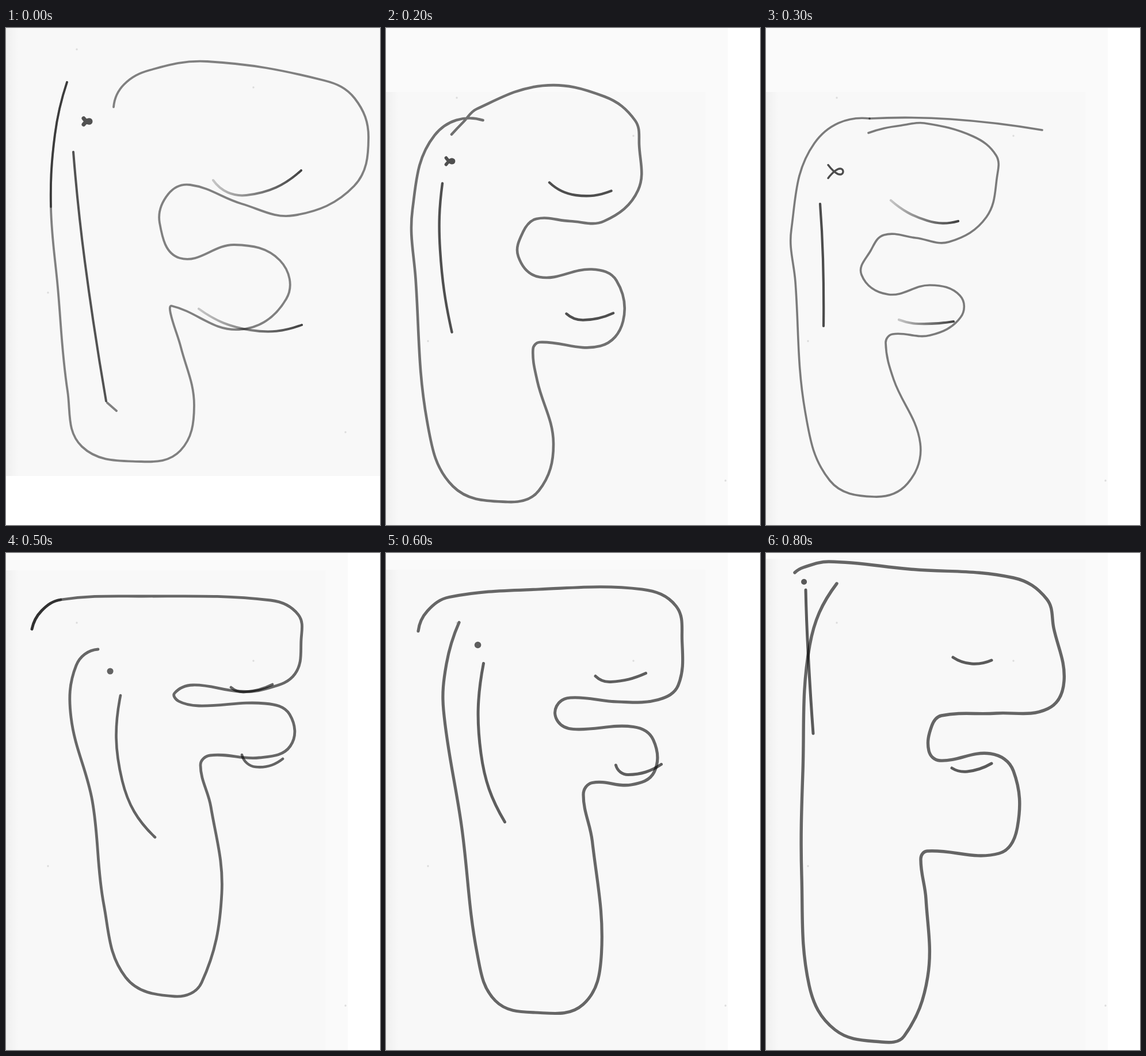
Recreate the animation shown at these times as an HTML page. Size 650 px wide and 862 px high, loop 900 ms.

```html
<!DOCTYPE html>
<html lang="en">
<head>
<meta charset="utf-8">
<title>Hand-drawn F</title>
<style>
html, body { margin: 0; width: 100%; height: 100%; overflow: hidden; background: #fff; }
svg { display: block; width: 100%; height: 100%; }
#ink { fill: none; stroke-linecap: round; stroke-linejoin: round; }
#ink * { mix-blend-mode: multiply; }
</style>
</head>
<body>
<svg viewBox="0 0 650 862">
  <defs>
    <linearGradient id="edge">
      <stop offset="0" stop-opacity=".035"/>
      <stop offset="1" stop-opacity="0"/>
    </linearGradient>
    <linearGradient id="fade">
      <stop offset="0" stop-color="#ccc"/>
      <stop offset=".5" stop-color="#808080"/>
      <stop offset="1" stop-color="#444"/>
    </linearGradient>
    <clipPath id="cut"><path d="M0 112H650V862H0Z"/></clipPath>
  </defs>
  <g id="paper"></g>
  <g id="ink"></g>
</svg>
<script>
const STEP = 100;
const paper = document.getElementById('paper');
const ink = document.getElementById('ink');

const points = s => s.trim().split(/\s+/).map(p => p.split(',').map(Number));

// Key points, the same landmarks in each drawing: top, right side, notch, lower arm, stem, left side.
// Marks: stem line, upper arm line, lower arm line, three points each.
const drawing = (outline, marks, dot, pen, style) => {
  const m = points(marks);
  return {
    outline: points(outline), marks: [0, 3, 6].map(i => m.slice(i, i + 3)),
    dot, pen, knot: 0, ...style
  };
};

const drawings = [
  drawing(`187,137 205,98 250,73 350,58 553,91 606,122 630,190 605,274 500,325 410,305
    320,272 282,288 267,338 302,399 397,376 476,403 487,470 405,523 288,482 286,495
    304,554 327,655 303,733 235,752 132,726 107,630 90,450 78,310 85,185 106,94`,
    '117,215 137,405 174,647 360,264 418,290 513,247 335,487 425,524 514,515',
    [147, 162], { line: 3.8, tone: 132, mark: 4, markTone: 84, dot: 7 },
    { knot: 12, fade: true, dark: [27, 29], tail: points('176,650 192,664'), short: true }),
  drawing(`50,187 64,152 80,112 270,35 400,50 466,100 478,150 493,235 440,299 380,306
    318,303 295,320 294,365 322,402 430,391 464,412 486,515 460,570 314,559 303,568
    304,615 314,720 285,815 235,831 122,805 75,700 52,430 48,280 85,172 157,163`,
    '102,234 89,370 129,538 351,237 380,246 449,230 396,485 420,500 464,480',
    [101, 213], { line: 5.6, tone: 104, mark: 4.6, markTone: 84, dot: 8 },
    { top: 111, cut: true, ring: 5 }),
  drawing(`178,182 205,174 235,169 275,165 360,188 400,221 402,255 383,328 318,371 260,364
    205,359 182,386 166,428 212,462 285,446 337,464 338,502 285,533 220,531 208,546
    222,610 268,720 246,790 188,813 111,785 68,665 51,440 44,350 84,200 180,157`,
    '94,305 99,400 100,517 217,299 280,334 334,335 231,506 265,513 326,509',
    [134, 249], { line: 3.6, tone: 126, mark: 4.2, markTone: 78, dot: 3.4 },
    { top: 111, knot: 26, fade: true, tail: points('180,157 320,158 480,177') }),
  drawing(`45,132 62,100 95,81 230,75 460,82 508,107 513,150 502,210 450,236 405,240
    325,229 293,243 300,257 335,265 450,261 493,280 494,335 440,355 355,351 338,368
    356,440 375,590 340,745 293,769 208,736 170,610 150,430 113,285 122,195 160,167`,
    '199,247 202,395 259,493 391,233 415,241 463,228 410,350 434,371 481,357',
    [181, 205], { line: 4.8, tone: 106, mark: 4.6, markTone: 102, dot: 11 },
    { top: 30, dark: [0, 2] }),
  drawing(`67,139 82,101 125,72 300,51 430,44 500,77 516,150 514,248 496,273 400,276
    316,273 300,288 298,328 316,346 410,342 436,368 438,425 412,449 362,446 348,470
    361,560 374,798 345,821 225,825 172,817 147,780 113,520 87,260 88,190 94,74`,
    '140,136 128,300 154,440 337,194 366,206 440,189 389,386 408,398 476,376',
    [138, 114], { line: 5.6, tone: 104, mark: 5.4, markTone: 92, dot: 12 }, { top: 28 }),
  drawing(`50,34 65,25 110,15 250,28 430,43 488,80 500,130 518,222 490,270 400,278
    305,282 288,300 283,343 302,360 390,348 430,378 437,475 405,521 280,517 269,530
    278,600 281,735 240,838 200,848 120,827 75,750 62,560 64,380 76,160 123,53`,
    '69,64 73,170 82,313 325,181 357,192 392,186 323,373 350,379 392,365',
    [66, 50], { line: 5.4, tone: 104, mark: 5, markTone: 92, dot: 10 }, { top: 10 })
];

// Halfway between two values of the same structure.
function mix(a, b) {
  if (typeof a === 'number') return (a + b) / 2;
  if (Array.isArray(a)) return a.map((v, i) => mix(v, b[i]));
  return Object.fromEntries(Object.keys(a).map(k => [k, mix(a[k], b[k])]));
}

function between(a, b) {
  const pick = ({ outline, marks, dot, pen, knot, top }) => ({ outline, marks, dot, pen, knot, top });
  return mix(pick(a), pick(b));
}

const unit = ([x, y]) => {
  const n = Math.hypot(x, y) || 1;
  return [x / n, y / n];
};
const diff = (a, b) => [b[0] - a[0], b[1] - a[1]];

// Direction at an open end: the neighbour's direction mirrored in the chord.
function mirror(dir, chord) {
  const [x, y] = unit(chord), k = 2 * (x * dir[0] + y * dir[1]);
  return [k * x - dir[0], k * y - dir[1]];
}

// Smooth curve whose handles follow the neighbouring points.
function curve(pts, from = 0, to = pts.length - 1) {
  const last = pts.length - 1;
  const dir = pts.map((p, i) => unit(diff(pts[Math.max(i - 1, 0)], pts[Math.min(i + 1, last)])));
  if (last > 1) {
    dir[0] = mirror(dir[1], diff(pts[0], pts[1]));
    dir[last] = mirror(dir[last - 1], diff(pts[last - 1], pts[last]));
  }
  let d = `M${pts[from]}`;
  for (let i = from + 1; i <= to; i++) {
    const a = pts[i - 1], b = pts[i], h = Math.hypot(...diff(a, b)) / 2.7;
    const out = a.map((v, k) => v + dir[i - 1][k] * h);
    const into = b.map((v, k) => v - dir[i][k] * h);
    d += `C${[...out, ...into, ...b].map(n => n.toFixed(1))}`;
  }
  return d;
}

// A small crossed loop opening to the left; size 0 leaves a dot.
function knot([x, y], size) {
  const pts = [];
  for (let t = -1; t <= 1.01; t += 0.2) {
    pts.push([x - size * t * t, y + size * 1.1 * (t ** 3 - 0.6 * t)]);
  }
  return size ? curve(pts) : `M${x} ${y}h.1`;
}

const grey = n => `rgb(${n},${n},${n})`;
const stroke = (d, width, color, attr = '') =>
  `<path d="${d}" stroke="${color}" stroke-width="${width}" ${attr}/>`;
const rect = (x, y, w, h, fill) =>
  `<rect x="${x}" y="${y}" width="${w}" height="${h}" fill="${fill}"/>`;

function paperMarkup({ top = 0, short }) {
  const lift = short ? 84 : 0, w = short ? 650 : 594, h = 862 - lift - (short ? 1 : 0);
  const specks = [[123, 121], [430, 187], [73, 543], [590, 785]]
    .map(([x, y]) => `<circle cx="${x}" cy="${y - lift}" r="1.7" fill="#dcdcdc"/>`).join('');
  return rect(0, 0, w, h, '#fafafa') + rect(0, top, short ? w : 555, h - top, '#f8f8f8') +
    rect(0, top, 22, h - top, 'url(#edge)') + specks;
}

function inkMarkup({ outline, marks, dot, pen, knot: size, cut, fade, dark, tail, ring }) {
  const tone = grey(pen.tone), markTone = grey(pen.markTone);
  const [stem, ...arms] = marks;
  let s = stroke(curve(outline), pen.line, tone, cut ? 'clip-path="url(#cut)"' : '') +
    stroke(curve(stem), pen.mark, markTone) +
    stroke(knot(dot, size), pen.dot, markTone);
  for (const arm of arms) {
    s += stroke(curve(arm), pen.mark, fade ? 'url(#fade)' : markTone);
    if (ring) {
      const [x, y] = arm[2];
      s += `<circle cx="${x + ring}" cy="${y}" r="${ring}" stroke="${markTone}" stroke-width="4"/>`;
    }
  }
  if (dark) s += stroke(curve(outline, ...dark), pen.line, grey(120));
  if (tail) s += stroke(curve(tail), pen.line, tone);
  return s;
}

const [a, b, c, d, e, f] = drawings;
const poses = [a, b, between(b, c), c, between(c, d), d, between(d, e), e, f]
  .map(pose => [paperMarkup(pose), inkMarkup(pose)]);

let shown = -1;
function render(time) {
  const i = Math.floor(Math.max(time, 0) / STEP) % poses.length;
  if (i === shown) return;
  shown = i;
  [paper.innerHTML, ink.innerHTML] = poses[i];
}

const start = performance.now();
function tick() {
  render(performance.now() - start);
  requestAnimationFrame(tick);
}
tick();
</script>
</body>
</html>
```
